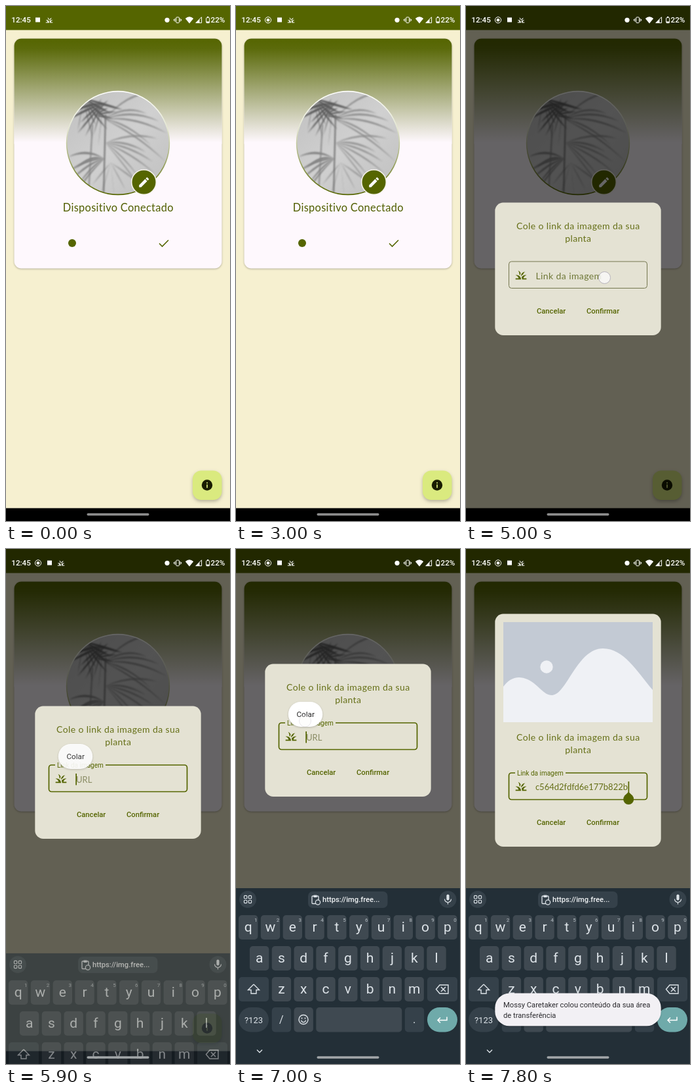
An HTML page with a canvas that plays this animation: 342x782 px, repeating every 8 s.

```html
<!DOCTYPE html>
<html lang="pt">
<head>
<meta charset="utf-8">
<style>
html, body { margin: 0; width: 100%; height: 100%; overflow: hidden; background: #000; }
canvas { display: block; width: 342px; height: 782px; }
</style>
</head>
<body>
<canvas id="stage"></canvas>
<script>
const W = 342, H = 782, LOOP = 8000, STEP = 100;
const OLIVE = '#556500', INK = '#515f02', SOFT_INK = '#667018', PAPER = '#e4e2d3';
const dpr = window.devicePixelRatio || 1;

function sized(canvas) {
  canvas.width = W * dpr;
  canvas.height = H * dpr;
  return canvas;
}

const stage = sized(document.getElementById('stage')).getContext('2d');
let c = stage;

// Draws a static part once, so it can later be faded as a whole.
function prerender(draw) {
  const layer = sized(document.createElement('canvas'));
  c = layer.getContext('2d');
  c.scale(dpr, dpr);
  draw();
  c = stage;
  return layer;
}

const clamp = x => Math.max(0, Math.min(1, x));
const ramp = (t, from, length) => clamp((t - from) / length);
const mix = (a, b, p) => a + (b - a) * p;
const within = (t, a, b) => t >= a && t < b;

function box(x, y, w, h, r, fill) {
  c.beginPath();
  c.roundRect(x, y, w, h, r);
  if (fill) { c.fillStyle = fill; c.fill(); }
}

function outline(color, width) {
  c.strokeStyle = color;
  c.lineWidth = width;
  c.stroke();
}

function disc(x, y, r, fill, stroke, width = 1) {
  c.beginPath();
  c.arc(x, y, r, 0, 7);
  if (fill) { c.fillStyle = fill; c.fill(); }
  if (stroke) outline(stroke, width);
}

function line(color, width, ...pts) {
  c.beginPath();
  for (let i = 0; i < pts.length; i += 2) c.lineTo(pts[i], pts[i + 1]);
  outline(color, width);
}

function poly(color, ...pts) {
  c.beginPath();
  for (let i = 0; i < pts.length; i += 2) c.lineTo(pts[i], pts[i + 1]);
  c.fillStyle = color;
  c.fill();
}

function text(str, x, y, size, color, { font = 'Roboto', weight = 400, align = 'left', gap = 0 } = {}) {
  c.font = `${weight} ${size}px ${font}, sans-serif`;
  c.letterSpacing = gap + 'px';
  c.textAlign = align;
  c.fillStyle = color;
  c.fillText(str, x, y);
  c.letterSpacing = '0px';
}

function withAlpha(a, draw) {
  if (a <= 0) return;
  c.save();
  c.globalAlpha *= a;
  draw();
  c.restore();
}

function shadowed(blur, dy, alpha, draw) {
  c.save();
  c.shadowColor = `rgba(0,0,0,${alpha})`;
  c.shadowBlur = blur * dpr;
  c.shadowOffsetY = dy * dpr;
  draw();
  c.restore();
}

// Icons on a 24 unit grid.
const PENCIL = new Path2D('M3 17.25V21h3.75L17.8 9.95 14.05 6.2zM20.7 7.05c.4-.4.4-1 0-1.4L18.35 3.3c-.4-.4-1-.4-1.4 0L15.1 5.1l3.75 3.75z');
const GRASS = new Path2D('M12 20H2v-2h5.75C7 15.2 4.8 13 2 12.25 7.5 11 12 15 12 20z' +
  'M22 12.25c-3.6-.9-7.1.7-8.9 3.7.6 1.3.9 2.7.9 4.05h8v-2h-5.75c.75-2.8 2.95-5 5.75-5.75z' +
  'M15.65 11c.8-2.1 2.2-3.8 4.1-5C15.4 6.15 12 9.65 12 14c1-1.25 2.2-2.3 3.65-3z' +
  'M11.4 8.85C10.6 6.65 8.9 4.9 6.7 4 8.4 6.1 9.2 8.7 9 11.3l1.2.85c.1-1.15.55-2.3 1.2-3.3z');

function icon(path, x, y, size, color) {
  c.save();
  c.translate(x - size / 2, y - size / 2);
  c.scale(size / 24, size / 24);
  c.fillStyle = color;
  c.fill(path);
  c.restore();
}

function touchDot(x, y) {
  disc(x, y, 9, 'rgba(248,247,246,.88)', 'rgba(150,145,165,.6)', 1);
}

// A spray of tapering blades that leave one point and droop.
function blades(x, y, count, from, to, length, droop, width, color) {
  c.fillStyle = color;
  for (let i = 0; i < count; i++) {
    const a = mix(from, to, i / (count - 1)), r = length * (0.85 + 0.15 * Math.cos(i * 2.4));
    const dx = Math.cos(a) * r, dy = Math.sin(a) * r;
    c.beginPath();
    c.moveTo(x, y);
    c.quadraticCurveTo(x + dx * 0.5, y + dy * 0.6 - width, x + dx, y + dy + droop);
    c.quadraticCurveTo(x + dx * 0.5, y + dy * 0.6 + width, x, y);
    c.fill();
  }
}

function photo() {
  c.save();
  c.beginPath();
  c.arc(171, 208, 78, 0, 7);
  c.clip();
  const g = c.createLinearGradient(110, 140, 235, 275);
  g.addColorStop(0, '#c2c2c2');
  g.addColorStop(0.5, '#d0d0d0');
  g.addColorStop(1, '#c2c2c2');
  c.fillStyle = g;
  c.fillRect(90, 128, 162, 162);
  c.filter = `blur(${0.8 * dpr}px)`;
  blades(150, 172, 6, -0.75, 0.35, 102, 30, 2.6, '#8b8b8b');
  blades(152, 208, 6, -0.35, 0.75, 84, 22, 2.6, '#929292');
  blades(150, 232, 6, 2.5, 3.6, 62, 24, 3.2, '#818181');
  blades(160, 238, 5, 0.5, 2.4, 54, 8, 3, '#9a9a9a');
  blades(118, 140, 8, 0.25, 1.75, 62, 2, 4, '#5c5c5c');
  blades(148, 148, 7, 1.7, 3.1, 56, 10, 3.8, '#595959');
  blades(136, 166, 7, -1.9, 0.1, 34, 2, 2.6, '#606060');
  line('#707070', 2, 152, 165, 149, 288);
  line('#858585', 1.8, 132, 180, 126, 285);
  c.restore();
  const ring = c.createLinearGradient(0, 129, 0, 287);
  ring.addColorStop(0, '#fff');
  ring.addColorStop(0.35, '#e4e7d2');
  ring.addColorStop(1, OLIVE);
  disc(171, 208, 78.4, null, ring, 1.6);
}

function homeScreen() {
  c.fillStyle = '#f6f0d0';
  c.fillRect(0, 0, W, 762.5);
  c.fillStyle = OLIVE;
  c.fillRect(0, 0, W, 36.5);
  shadowed(3, 1, 0.28, () => box(12.5, 49.5, 317, 349, 11, '#fef8fd'));
  const g = c.createLinearGradient(0, 49, 0, 207);
  g.addColorStop(0, OLIVE);
  g.addColorStop(0.1, '#5b6a0b');
  g.addColorStop(1, '#fef8fd');
  box(12.5, 49.5, 317, 160, [11, 11, 0, 0], g);
  photo();
  disc(210.5, 267.5, 18.8, OLIVE, '#f6f3ec', 1.6);
  icon(PENCIL, 210.7, 267.7, 20, '#fff');
  text('Dispositivo Conectado', 171.3, 312.4, 16.4, INK, { font: 'Lato', align: 'center', gap: 0.3 });
  disc(101, 360, 6, OLIVE);
  line(OLIVE, 1.6, 234, 360.5, 238.5, 365, 248, 355.5);
  shadowed(5, 2.5, 0.26, () => box(285, 705.5, 44.5, 44.5, 13, '#daea7f'));
  disc(307, 727.5, 8.2, '#1a1e00');
  c.fillStyle = '#daea7f';
  c.fillRect(306.2, 726.5, 1.7, 5.2);
  c.fillRect(306.2, 723.3, 1.7, 1.7);
}

function statusBar(t) {
  const shown = ramp(t, 0, 400), shift = 18 * shown;
  text('12:45', 8.3, 25, 11.65, '#fff', { weight: 500 });
  withAlpha(shown, () => {
    disc(49, 21.3, 4.6, null, '#fff', 1);
    disc(49, 21.3, 2.4, '#fff');
  });
  box(45 + shift, 17.5, 7, 7, 0, '#fff');
  icon(GRASS, 66 + shift, 21.3, 12.5, '#fff');
  disc(246, 21.3, 3.6, '#fff');
  box(259.8, 17, 4.6, 8.6, 1);
  outline('#fff', 1);
  for (const s of [-1, 1]) {
    line('#fff', 1, 262 + s * 4, 18.8, 262 + s * 4, 23.8);
    line('#fff', 1, 262 + s * 5.6, 20, 262 + s * 5.6, 22.5);
  }
  c.beginPath();
  c.moveTo(280, 26.5);
  c.lineTo(273.8, 19);
  c.quadraticCurveTo(280, 13.5, 286.2, 19);
  c.fillStyle = '#fff';
  c.fill();
  line('#fff', 1, 289.8, 25.6, 298.6, 25.6, 298.6, 16.8, 289.8, 25.6);
  poly('#fff', 289.5, 26, 295.5, 20, 295.5, 26);
  box(305.7, 17.7, 5, 8, 1);
  outline('#fff', 1);
  c.fillStyle = '#fff';
  c.fillRect(307, 16, 2.4, 1.5);
  c.fillRect(306, 23.5, 4.4, 2);
  text('22%', 312.6, 25, 11.65, '#fff', { weight: 500 });
}

function placeholderImage(top) {
  c.save();
  c.translate(0, top);
  c.fillStyle = '#c3cad4';
  c.fillRect(57, 13, 228, 152);
  c.beginPath();
  c.moveTo(57, 111);
  c.bezierCurveTo(66, 99, 78, 93, 94, 100);
  c.bezierCurveTo(111, 108, 119, 125, 132, 124);
  c.bezierCurveTo(154, 122, 170, 53, 209, 53);
  c.bezierCurveTo(241, 53, 261, 88, 285, 116);
  c.lineTo(285, 165);
  c.lineTo(57, 165);
  c.fillStyle = '#eff1f5';
  c.fill();
  disc(123, 81, 9.7, '#eff1f5');
  c.restore();
}

const keyboardRise = t => 1 - Math.pow(1 - ramp(t, 5700, 500), 1.8);

function dialog(t) {
  const loaded = t >= 7300, pasted = t >= 7200, focused = t >= 5600;
  const height = loaded ? 354 : 202;
  const middle = mix(399.5, 275.5, keyboardRise(t - 45));
  const top = Math.round(middle - height / 2 - 0.4);
  const lift = top + height - 500;
  const lato = { font: 'Lato', gap: 0.4 };

  box(44.3, top + 0.5, 253.4, height - 0.5, 12.5, PAPER);
  if (loaded) placeholderImage(top);

  c.save();
  c.translate(0, lift);
  text('Cole o link da imagem da sua', 171.3, 339, 14, SOFT_INK, { ...lato, align: 'center' });
  text('planta', 171.3, 358, 14, SOFT_INK, { ...lato, align: 'center' });

  box(65.5, 388, 211, 40.5, 4);
  outline(focused ? OLIVE : '#75774f', focused ? 1.7 : 1);
  icon(GRASS, 84, 408.5, 20, OLIVE);

  const float = ramp(t, 5500, 150);
  if (float > 0) {
    c.fillStyle = PAPER;
    c.fillRect(75, 386, 77 * float, 5);
  }
  if (float < 1) {
    text('Link da imagem', mix(106.5, 78, float), mix(414.5, 391.5, float), mix(14, 10, float), '#6f7838', lato);
  } else {
    text('Link da imagem', 78, 391.5, 10, OLIVE);
  }

  if (pasted) {
    text('c564d2fdfd6e177b822b', 247, 414, 13, SOFT_INK, { font: 'Lato', align: 'right' });
  } else if (float >= 1) {
    text('URL', 107, 414.5, 13, '#8b8d66', { font: 'Lato' });
  }

  const caret = pasted ? (t - 7200) % 1000 < 500 || t >= 7700 : focused && (t - 5600) % 1000 < 500;
  if (caret) {
    c.fillStyle = OLIVE;
    c.fillRect(pasted ? 247.5 : 106.3, 401, 1.7, 17.5);
  }
  if (pasted) {
    disc(248.2, 428, 8, OLIVE);
    poly(OLIVE, 248.2, 416.8, 254, 422.5, 242.4, 422.5);
  }

  text('Cancelar', 108, 467, 11.2, OLIVE, { weight: 500 });
  text('Confirmar', 184, 467, 11.2, OLIVE, { weight: 500 });

  if (t < 7100) {
    withAlpha(ramp(t, 5700, 220), () => {
      shadowed(3, 1, 0.2, () => box(79.8, 356, 52.4, 38, 19, '#fff'));
      text('Colar', 106.2, 379, 11.65, '#222', { align: 'center' });
    });
  }
  c.restore();
}

const KEY = '#3f4951', DIM_KEY = '#35414a', GLYPH = '#dde3e8';

function letterKeys(letters, first, y, hints) {
  [...letters].forEach((ch, i) => {
    const x = first + i * 33.8;
    box(x - 14.7, y, 29.4, 37, 5, KEY);
    text(ch, x, y + 25, 21, GLYPH, { align: 'center' });
    if (hints) text((i + 1) % 10, x + 11.5, y + 9.5, 8, '#b9c1c7', { align: 'center' });
  });
}

function drawKeyboard() {
  c.fillStyle = '#232f37';
  c.fillRect(0, 515, W, 267);

  disc(18, 532, 13, DIM_KEY);
  for (const dx of [-3.4, 3.4]) for (const dy of [-3.4, 3.4]) {
    box(18 + dx - 2.2, 532 + dy - 2.2, 4.4, 4.4, 1);
    outline(GLYPH, 1.1);
  }
  box(110, 520, 121.5, 25, 7, DIM_KEY);
  box(116, 527, 10, 11.5, 1);
  outline(GLYPH, 1.3);
  c.fillStyle = GLYPH;
  c.fillRect(118.5, 525.5, 5, 3.5);
  disc(125, 536.5, 3.6, DIM_KEY, GLYPH, 1.2);
  text('https://img.free...', 132, 536, 11.2, '#f0f3f5', { weight: 500 });
  disc(323.5, 532, 13, DIM_KEY);
  box(321.4, 524.5, 4.2, 9, 2.1, GLYPH);
  c.beginPath();
  c.arc(323.5, 531.5, 5, 0, Math.PI);
  outline(GLYPH, 1.2);
  line(GLYPH, 1.2, 323.5, 536, 323.5, 539.5);

  letterKeys('qwertyuiop', 18.7, 556, true);
  letterKeys('asdfghjkl', 35.6, 603);
  letterKeys('zxcvbnm', 69.4, 650);

  box(4, 650, 46, 37, 5, DIM_KEY);
  line(GLYPH, 1.4, 27, 661, 18.5, 669.5, 23, 669.5, 23, 675, 31, 675, 31, 669.5, 35.5, 669.5, 27, 661);
  box(292, 650, 46, 37, 5, DIM_KEY);
  line(GLYPH, 1.4, 311, 662, 324, 662, 324, 675, 311, 675, 305.5, 668.5, 311, 662, 312, 662);
  line(GLYPH, 1.4, 313, 665, 320, 672);
  line(GLYPH, 1.4, 320, 665, 313, 672);

  box(4, 696, 46, 37.5, 18.7, DIM_KEY);
  text('?123', 27, 719.5, 13, GLYPH, { align: 'center' });
  box(54.7, 696, 29.4, 37.5, 5, DIM_KEY);
  text('/', 69.4, 720, 16, GLYPH, { align: 'center' });
  box(88.5, 696, 29.4, 37.5, 5, KEY);
  disc(103, 714.5, 7, null, GLYPH, 1.4);
  disc(100.5, 712.5, 1, GLYPH);
  disc(105.5, 712.5, 1, GLYPH);
  c.beginPath();
  c.arc(103, 715, 3.6, 0.2, Math.PI - 0.2);
  outline(GLYPH, 1.4);
  box(122.3, 696, 131, 37.5, 5, KEY);
  box(257.8, 696, 29.4, 37.5, 5, DIM_KEY);
  text('.', 272.3, 720, 17, GLYPH, { align: 'center' });
  box(292, 696, 46, 37.5, 18.7, '#6faaaa');
  line('#fff', 1.5, 322, 710.5, 322, 715.5, 308, 715.5);
  line('#fff', 1.5, 312, 711.5, 308, 715.5, 312, 719.5);
  line(GLYPH, 1.3, 32, 760.5, 36, 764.5, 40, 760.5);
}

function toast(t) {
  const p = ramp(t, 7200, 300);
  withAlpha(p, () => {
    c.translate(0, 16 * (1 - p) * (1 - p));
    shadowed(3, 1, 0.2, () => box(44.3, 674.5, 253.4, 49.8, 22, '#f2f0f4'));
    text('Mossy Caretaker colou conteúdo da sua área', 57, 696, 11.2, '#2b2a2e');
    text('de transferência', 57, 712, 11.2, '#2b2a2e');
  });
}

const home = prerender(homeScreen);
const keyboard = prerender(drawKeyboard);

function render(t) {
  c.setTransform(dpr, 0, 0, dpr, 0, 0);
  c.fillStyle = '#000';
  c.fillRect(0, 0, W, H);
  c.drawImage(home, 0, 0, W, H);
  if (within(t, 3300, 3500)) touchDot(212, 269);

  c.fillStyle = `rgba(0,0,0,${0.6 * ramp(t, 3350, 350)})`;
  c.fillRect(0, 0, W, H);
  statusBar(t);
  withAlpha(ramp(t, 3400, 200), () => dialog(t));
  if (within(t, 5000, 5600)) touchDot(211.5, 412.5);

  const rise = keyboardRise(t);
  withAlpha(rise, () => c.drawImage(keyboard, 0, 248 * (1 - rise), W, H));
  if (t >= 6900) withAlpha(1 - ramp(t, 6900, 150), () => touchDot(105.5, 261));
  toast(t);
  box(123.5, 770.3, 95, 3.4, 1.7, rise > 0.5 ? '#a3a7a9' : '#909090');
}

let last = -1;
function tick() {
  const t = Math.floor((performance.now() % LOOP) / STEP) * STEP;
  if (t !== last) render(last = t);
  requestAnimationFrame(tick);
}
tick();
</script>
</body>
</html>
```
